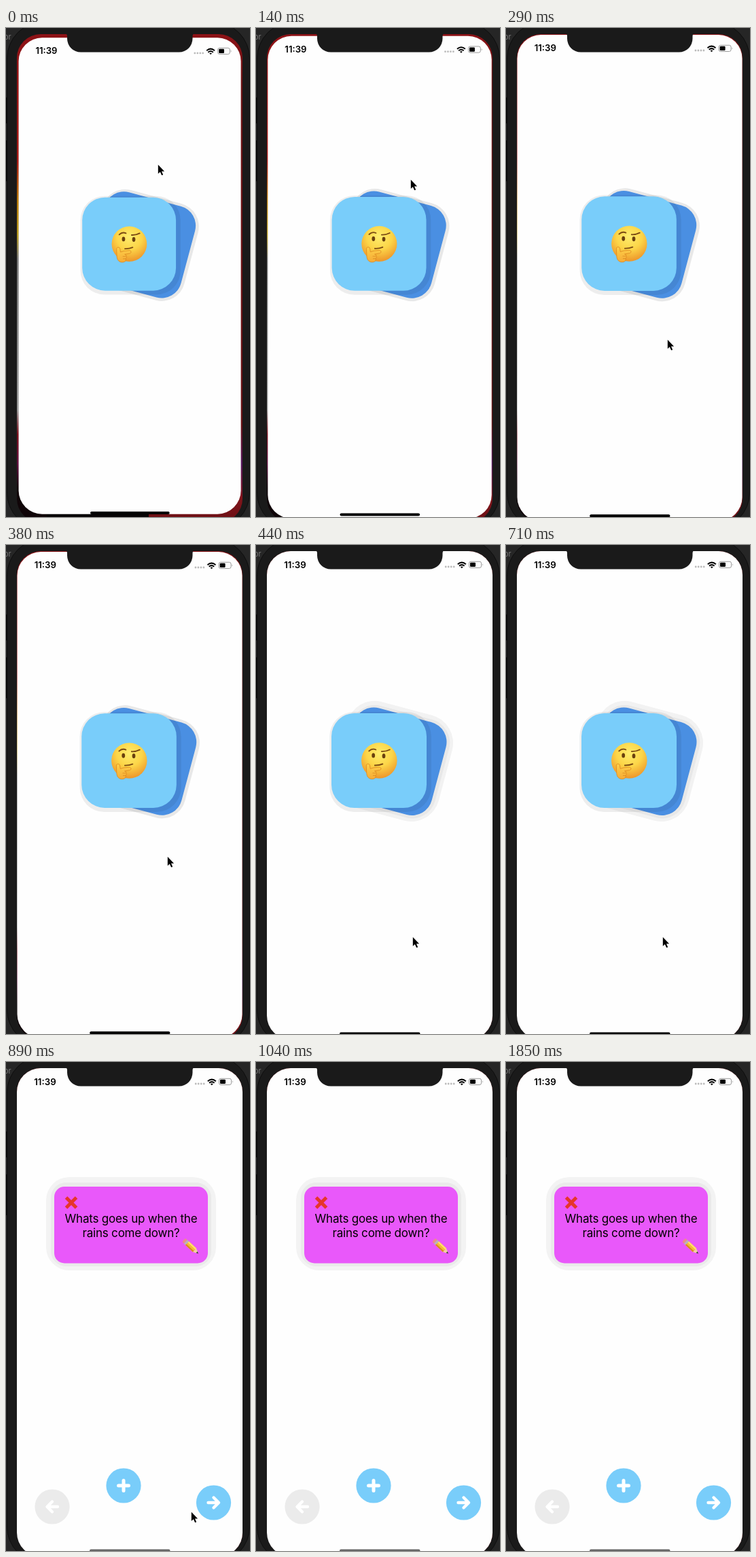
Write an HTML page that moves like this. It is 359 px wide and 718 px high and loops after 2390 ms.

```html
<!DOCTYPE html>
<html lang="en">
<head>
<meta charset="utf-8">
<title>Flash cards</title>
<style>
html, body { margin: 0; width: 100%; height: 100%; overflow: hidden; background: #191919; }
svg { display: block; width: 359px; height: 718px; }
text { font-family: Inter, Roboto, sans-serif; }
.line { fill: none; stroke-linecap: round; stroke-linejoin: round; }
.question { font-size: 17px; letter-spacing: -.2px; text-anchor: middle; }
</style>
</head>
<body>
<svg viewBox="0 0 359 718">
  <defs>
    <linearGradient id="leftEdge" x2="0" y2="1">
      <stop offset="0" stop-color="#8c1216"/>
      <stop offset=".26" stop-color="#a81a16"/>
      <stop offset=".34" stop-color="#b87a08"/>
      <stop offset=".41" stop-color="#b69a20"/>
      <stop offset=".46" stop-color="#777"/>
      <stop offset=".77" stop-color="#999"/>
      <stop offset=".82" stop-color="#7a101c"/>
      <stop offset=".88" stop-color="#601040"/>
      <stop offset=".93" stop-color="#100508"/>
    </linearGradient>
    <linearGradient id="rightEdge" x2="0" y2="1">
      <stop offset="0" stop-color="#8c1216"/>
      <stop offset=".1" stop-color="#681012"/>
      <stop offset=".8" stop-color="#651013"/>
      <stop offset=".88" stop-color="#54145c"/>
      <stop offset=".95" stop-color="#80151b"/>
      <stop offset="1" stop-color="#6a0f14"/>
    </linearGradient>
    <radialGradient id="skin" cx=".5" cy=".3" r=".72">
      <stop offset="0" stop-color="#fdec6c"/>
      <stop offset=".5" stop-color="#fcd548"/>
      <stop offset="1" stop-color="#ec9128"/>
    </radialGradient>
    <linearGradient id="hand" x2="0" y2="1">
      <stop offset="0" stop-color="#fdd04a"/>
      <stop offset="1" stop-color="#f6ab35"/>
    </linearGradient>
    <clipPath id="screen"><rect x="16" y="9" width="332" height="717" rx="35"/></clipPath>
  </defs>

  <!-- Desktop and phone body -->
  <rect width="359" height="718" fill="#262626"/>
  <text x="-3" y="17" font-size="11" fill="#777">or</text>
  <rect x="1.5" y="-9" width="357" height="745" rx="54" fill="#1a1a1a" stroke="#0e0e0e"/>
  <path d="M1 102v38M1 165v60" stroke="#080808" stroke-width="2"/>

  <!-- Wallpaper behind the opening app -->
  <g clip-path="url(#screen)">
    <rect x="16" y="9" width="166" height="717" fill="url(#leftEdge)"/>
    <rect x="181" y="9" width="167" height="717" fill="url(#rightEdge)"/>
    <rect x="60" y="700" width="150" height="26" fill="#080506"/>
  </g>

  <g id="app">
    <rect id="window" x="16" y="9" width="332" rx="35" fill="#fefefe"/>
    <text x="41.2" y="33.5" font-size="13.3" font-weight="600">11:39</text>
    <g fill="#bbb">
      <circle cx="279.2" cy="32" r="1.4"/><circle cx="283.2" cy="32" r="1.4"/>
      <circle cx="287.2" cy="32" r="1.4"/><circle cx="291.2" cy="32" r="1.4"/>
    </g>
    <path d="M296.8 28.2q6-5.2 12 0M299 30.7q3.8-3.2 7.6 0" fill="none" stroke="#000" stroke-width="2"/>
    <path d="M300.9 32.2q1.9-1.5 3.8 0l-1.9 2z"/>
    <rect x="313.5" y="24.3" width="18" height="9.2" rx="2.6" fill="none" stroke="#999"/>
    <rect x="315" y="25.8" width="8" height="6.2" rx="1.2"/>
    <path d="M333 27.2q1.8 1.7 0 3.4z" fill="#999"/>
    <rect id="home" x="123" y="715.4" width="118.5" height="4" rx="2"/>

    <g id="deck">
      <g transform="translate(201.5 317.5) rotate(15)">
        <rect id="halo" x="-80" y="-80" width="160" height="160" rx="42" fill="#f2f2f2"/>
        <rect x="-73" y="-74" width="148" height="149" rx="35" fill="#e8e8e8"/>
        <rect x="-70" y="-70" width="140" height="140.5" rx="30" fill="#4a8fe2"/>
      </g>
      <rect x="108.3" y="245" width="149.5" height="147" rx="36" opacity=".065"/>
      <rect x="111" y="247" width="140" height="139" rx="34" fill="#79cdfa"/>
      <g transform="translate(181.3 316.5)">
        <circle r="26.3" fill="url(#skin)"/>
        <g fill="#69400f">
          <ellipse cx="-8.6" cy="-7.4" rx="2.4" ry="3.5"/>
          <ellipse cx="6.7" cy="-6.8" rx="2.4" ry="3.5"/>
        </g>
        <g class="line" stroke="#7a4a14" stroke-width="1.9">
          <path d="M-15-14q4.5-4.5 10-2M3.5-13.4q6 .4 12-2.6"/>
          <path d="M-6.500 7q6 .3 11.500-2"/>
        </g>
        <path d="M-19 7.500c-.2-3.200 4.600-3.600 5.200-.2l.6 4.700q5-2.200 13-2.400c3.600 0 3.800 4 .4 4.600l-7 1.200q3 .8 2.400 3 1 2-.8 3.400 1 5-5 5.400c-5 0-8-3.200-8.300-8.400z" fill="url(#hand)" stroke="#dc861e" stroke-width=".8"/>
        <path class="line" d="M-9.500 18.400h4M-9 22h3.500" stroke="#d98721" stroke-width=".8"/>
      </g>
    </g>

    <g id="quiz">
      <rect x="59" y="169" width="250" height="137" rx="34" fill="#f3f3f3"/>
      <rect x="66" y="177" width="236" height="123" rx="22" fill="#eaeaea"/>
      <rect x="71" y="183" width="226" height="112.5" rx="15" fill="#e958fa"/>
      <path d="M88.5 199l15 15m0-15l-15 15" stroke="#e6352c" stroke-width="5"/>
      <text class="question" x="184" y="235.5">Whats goes up when the</text>
      <text class="question" x="184" y="257">rains come down?</text>
      <g transform="translate(262.2 262) rotate(43)">
        <rect x="-1" y="-3.7" width="5" height="7.4" rx="2" fill="#e98a91"/>
        <path d="M3-3.7h3v7.4h-3z" fill="#b6b8bd"/>
        <path d="M6-3.7h15v7.4h-15z" fill="#f5bd36"/>
        <path d="M6-3.7h15v2.3h-15z" fill="#ffe069"/>
        <path d="M6 1.6h15v2.1h-15z" fill="#d98b20"/>
        <path d="M21-3.7l7.2 3.7-7.2 3.7z" fill="#f1d0a0"/>
        <path d="M25.3-1.5l3.2 1.5-3.2 1.5z" fill="#333"/>
      </g>
      <g class="line" stroke="#fff" stroke-width="4.4">
        <circle cx="68" cy="653" r="25.6" fill="#ebebeb" stroke="none"/>
        <path d="M76 653h-15m7-7.5l-7.5 7.5 7.5 7.5"/>
        <circle cx="173" cy="622" r="25.6" fill="#79cdfa" stroke="none"/>
        <path d="M165.5 622h15m-7.5-7.5v15" stroke-width="5"/>
        <circle cx="305.5" cy="647" r="25.6" fill="#79cdfa" stroke="none"/>
        <path d="M297.5 647h15m-7-7.5l7.5 7.5-7.5 7.5"/>
      </g>
    </g>
  </g>

  <!-- Notch -->
  <path d="M86 8a4 4 0 0 1 4 4v3.5a20 20 0 0 0 20 20h144.500a20 20 0 0 0 20-20v-3.500a4 4 0 0 1 4-4z" fill="#1a1a1a"/>

  <path id="cursor" d="M.8.8v13.200l3-2.700 2.300 5 2.100-.9-2.200-4.900h4.100z" stroke="#fff" stroke-width="1.6" paint-order="stroke"/>
</svg>
<script>
const LOOP = 2390;
// Each pose holds until the next: start time, app scale, window bottom, cursor tip.
const poses = [
  { at: 0, scale: .985, bottom: 719, tip: [223, 200] },
  { at: 140, scale: .992, bottom: 723, tip: [227, 222] },
  { at: 290, scale: .997, bottom: 725, tip: [237, 457] },
  { at: 440, scale: 1, bottom: 726, tip: [230, 575] },
  { at: 890, scale: 1, bottom: 726, tip: [272, 660] },
  { at: 1040, scale: 1, bottom: 726 }
];
const $ = id => document.getElementById(id);
const show = (id, on) => $(id).style.display = on ? "" : "none";

function draw(now) {
  const t = now % LOOP;
  const { scale, bottom, tip } = poses.findLast(p => p.at <= t);
  const quiz = t >= 890;
  $("app").setAttribute("transform", `translate(188 362) scale(${scale}) translate(-188 -362)`);
  $("window").setAttribute("height", bottom - 9);
  show("deck", !quiz);
  show("quiz", quiz);
  show("halo", t >= 440);
  show("cursor", tip);
  if (tip) $("cursor").setAttribute("transform", `translate(${tip})`);
  $("home").setAttribute("fill", quiz ? "#666" : "#000");
}

const start = performance.now();
function tick() {
  draw(performance.now() - start);
  requestAnimationFrame(tick);
}
tick();
</script>
</body>
</html>
```
